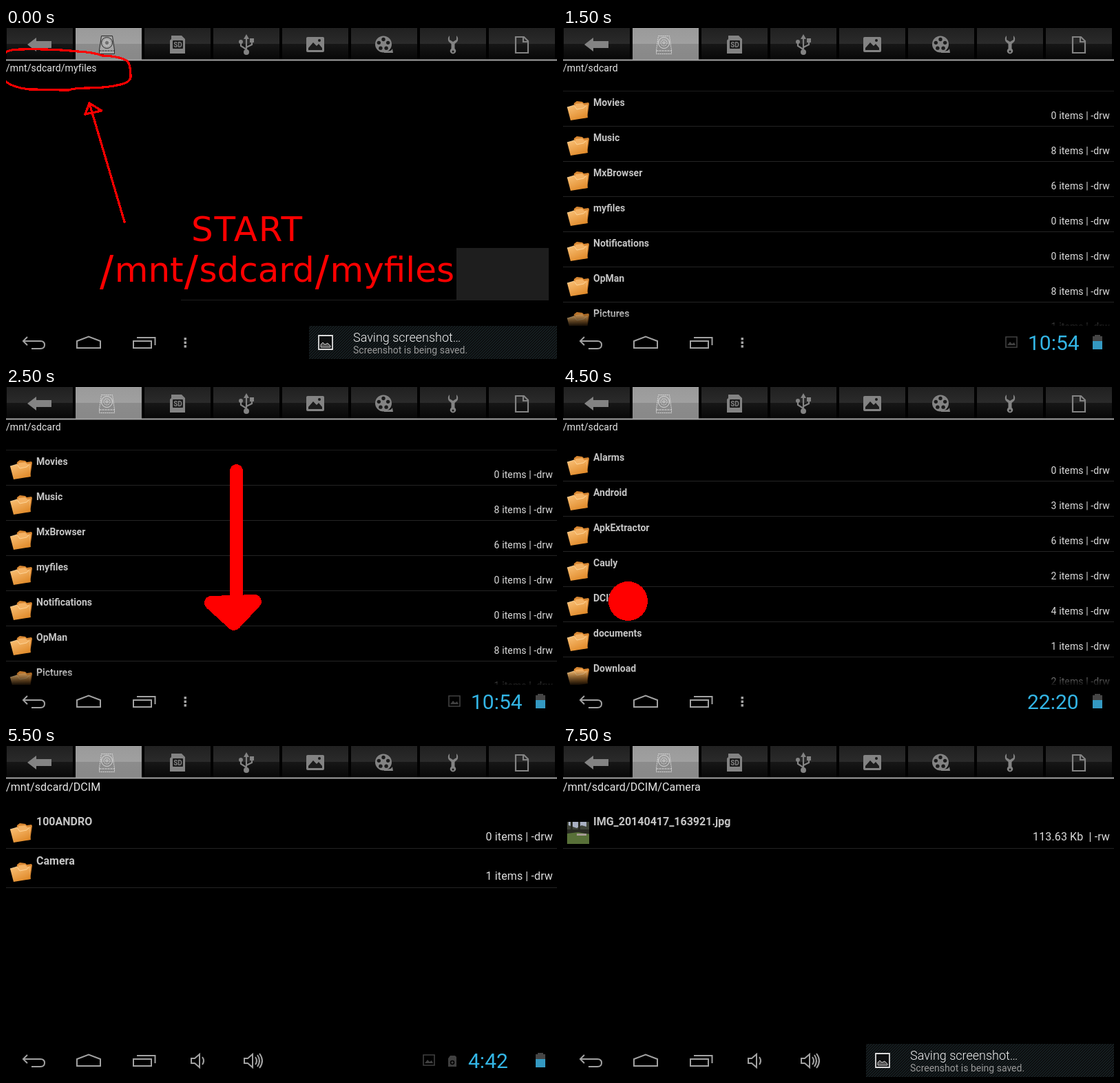
These frames come from a looping animation (800 px wide and 480 px high, 8000 ms). An HTML page:

```html
<!DOCTYPE html>
<html lang="en">
<head>
<meta charset="utf-8">
<title>File browser walkthrough</title>
<style>
  html, body { margin: 0; width: 100%; height: 100%; overflow: hidden; background: #000; }
  svg { display: block; width: 800px; height: 480px; font-family: Roboto, sans-serif; }
  .name { font-weight: 700; fill: #c4c4c4; }
  .info { text-anchor: end; fill: #dcdcdc; letter-spacing: .12px; }
  .path { fill: #e6e6e6; letter-spacing: .09px; }
  .red { fill: none; stroke: #f00; stroke-width: 3.2; stroke-linecap: round; stroke-linejoin: round; shape-rendering: crispEdges; }
  .big { font: 50px "DejaVu Sans", sans-serif; fill: #f00; }
  .nav { fill: none; stroke: #a2a2a2; stroke-width: 2; }
  .clock { font-size: 30px; fill: #33b5e5; }
</style>
</head>
<body>
<svg viewBox="0 0 800 480" xmlns="http://www.w3.org/2000/svg">
  <defs>
    <linearGradient id="tab" x2="0" y2="1">
      <stop offset="0" stop-color="#202020"/><stop offset=".5" stop-color="#2b2b2b"/>
      <stop offset=".5" stop-color="#171717"/><stop offset="1" stop-color="#070707"/>
    </linearGradient>
    <linearGradient id="tabOn" x2="0" y2="1">
      <stop offset="0" stop-color="#9a9a9a"/><stop offset=".5" stop-color="#a0a0a0"/>
      <stop offset=".5" stop-color="#8c8c8c"/><stop offset="1" stop-color="#888"/>
    </linearGradient>
    <linearGradient id="flap" x2=".6" y2="1">
      <stop offset="0" stop-color="#fbc37a"/><stop offset="1" stop-color="#e08a2a"/>
    </linearGradient>
    <linearGradient id="fade" x2="0" y2="1">
      <stop offset="0" stop-opacity="0"/><stop offset="1"/>
    </linearGradient>
    <pattern id="hatch" width="4" height="4" patternUnits="userSpaceOnUse">
      <rect width="4" height="4" fill="#0d0f10"/>
      <path d="M-1 1L1-1M0 4L4 0M3 5L5 3" stroke="#1d2c31" stroke-width=".9"/>
    </pattern>
    <g id="folder">
      <path d="M16-33L20-36L28-35L30-33L37-34L38-32L35-12L13-10Z" fill="#d88630"/>
      <path d="M18-32L28-33L31-30L36-31L34-14L14-12Z" fill="#f4b264"/>
      <path d="M6-27L16-30L20-24L30-26L33-29L36-12L11-8Z" fill="url(#flap)"/>
      <path d="M6-27L16-30L20-24L30-26L33-29" fill="none" stroke="#ffdca4" stroke-width=".8"/>
    </g>
    <g id="photo">
      <path d="M6-38H38V-6H6Z" fill="#3f4438"/>
      <path d="M8-38H34V-31L27-33L20-29L8-33Z" fill="#a9b0c2"/>
      <path d="M11-38H14V-22H11ZM22-38H25V-24H22ZM6-27H38V-21H6Z" fill="#282a22"/>
      <path d="M6-21L22-23L38-20V-6H6Z" fill="#587038"/>
      <path d="M20-21H34V-18H20Z" fill="#a79c96"/>
    </g>
    <g id="pic">
      <path d="M1 1H17V16H1Z" fill="none" stroke="#404040" stroke-width="1.6"/>
      <path d="M3 13L7 8L10 11L13 9L15 13Z" fill="#404040"/>
    </g>
  </defs>
  <rect width="800" height="480"/>
  <g id="tabs"></g>
  <path d="M0 46.5H800" stroke="#a4a4a4" stroke-width="2"/>
  <g fill="#838383">
    <path d="M31 24L44 14V19H66V29H44V34Z"/>
    <path d="M240 11H255L260 16V37H238V18L240 16Z"/>
    <rect x="242" y="18" width="15" height="12" rx="1" fill="#1b1b1b"/>
    <text x="249.5" y="28" font-size="10" font-weight="700" text-anchor="middle">SD</text>
    <path d="M349 9L353 16H345Z"/><circle cx="349" cy="35" r="4"/>
    <path d="M349 14V35M349 31L341 26V21M349 28L357 24V19" fill="none" stroke="#838383" stroke-width="2.2"/>
    <circle cx="341" cy="20" r="3"/><path d="M354 15H360V21H354Z"/>
    <rect x="436" y="13" width="26" height="22" rx="2"/>
    <path d="M439 32V29L446 21L451 26L454 23L459 29V32Z" fill="#1b1b1b"/><circle cx="455" cy="18" r="2" fill="#1b1b1b"/>
    <circle cx="548" cy="23.5" r="12"/><path d="M549 33Q559 35 561 30L562 36H549Z"/>
    <g id="holes" fill="#1b1b1b"></g>
    <path d="M644 11V17L649 20L654 17V11Q658 15 655 20L651.5 23V30Q654 32 653 35Q649 40 645 35Q644 32 646.5 30V23L643 20Q640 15 644 11Z"/>
    <circle cx="649" cy="34" r="1.5" fill="#1b1b1b"/>
    <path d="M740 13H752L758 19V36H740ZM751 13V20H758" fill="none" stroke="#838383" stroke-width="2.2"/>
  </g>
  <g id="view"></g>
</svg>
<script>
const $ = id => document.getElementById(id);
const text = (x, y, size, s, cls, attrs = '') => `<text x="${x}" y="${y}" font-size="${size}" class="${cls}" ${attrs}>${s}</text>`;
const shape = (d, attrs) => `<path d="${d}" ${attrs}/>`;
const use = (id, x, y) => `<use href="#${id}" x="${x}" y="${y}"/>`;
const dot = (x, y) => `<circle cx="${x}" cy="${y}" r="28.5" fill="#f00" shape-rendering="crispEdges"/>`;

for (let i = 0; i < 8; i++) {
  $('tabs').innerHTML += `<rect x="${i * 100 + 1}" width="96" height="46" fill="url(#${i === 1 ? 'tabOn' : 'tab'})"/>`;
}
for (let i = 0; i < 5; i++) {
  const a = (i * 72 - 90) * Math.PI / 180;
  $('holes').innerHTML += `<circle cx="${548 + 7 * Math.cos(a)}" cy="${23.5 + 7 * Math.sin(a)}" r="2.7"/>`;
}

function disk(dark) {
  const line = dark ? '#2a2a2a' : '#dadada';
  return `<g fill="none" stroke="${line}">` +
    shape('M138.5 11.5H154.5L157.5 32V37.5H135.5V32Z', dark ? 'fill="#a6a6a6"' : 'stroke-dasharray="2 1"') +
    shape('M135.5 33H157.5', 'stroke-dasharray="3 1"') +
    '<circle cx="146.5" cy="21.5" r="8"/><circle cx="146.5" cy="21.5" r="4.5" stroke="#ddd" stroke-dasharray="2 1"/>' +
    '<circle cx="146.5" cy="21.5" r="1.5"/></g>';
}

// Each row hangs from the rule below it.
function row(y, size, [name, info], icon = 'folder') {
  const small = size === 14;
  return use(icon, 0, y) + text(44, y - (small ? 29 : 33), size, name, 'name') +
    text(794, y - (small ? 10 : 11), size, info, 'info') +
    shape(`M0 ${y + .5}H800`, 'stroke="#242424"');
}

function list(y, items) {
  return items.map(([name, n], i) => row(y + i * 51, 14, [name, n + ' items | -drw'])).join('') +
    '<rect y="411" width="800" height="23" fill="url(#fade)"/>';
}

function nav(volume) {
  const extra = volume
    ? [269, 346].map((x, i) => shape(`M${x} 453H${x + 5}L${x + 12} 447V466L${x + 5} 460H${x}Z` +
        `M${x + 16} 451Q${x + 20} 456.5 ${x + 16} 462` +
        (i ? `M${x + 19} 448Q${x + 25} 456.5 ${x + 19} 465M${x + 22} 446Q${x + 30} 456.5 ${x + 22} 467` : ''),
        'class="nav"')).join('')
    : shape('M258.5 449H262V452.5H258.5ZM258.5 454.5H262V458H258.5ZM258.5 460H262V463.5H258.5Z', 'fill="#a2a2a2"');
  return '<rect y="432" width="800" height="48"/>' +
    shape('M31 448L25 454L31 460M25 454H50Q56 454 56 459.5T50 465H37', 'class="nav"') +
    shape('M103 464V454L120 447.5L137 454V464Z', 'class="nav"') +
    shape('M185 454H211V464H185ZM190 449H216.5V460', 'class="nav"') + extra;
}

function toast() {
  return '<rect x="440" y="432" width="360" height="48" fill="url(#hatch)"/>' +
    shape('M454 446H474V466H454Z', 'fill="#0d0f10" stroke="#dcdcdc" stroke-width="1.8"') +
    shape('M457 463V459L460 456L463 459L467 457L471 461V463Z', 'fill="#555" stroke="#c8c8c8"') +
    text(504, 455, 18, 'Saving screenshot…', '', 'font-weight="300" fill="#f2f2f2"') +
    text(504, 472, 14, 'Screenshot is being saved.', '', 'fill="#999"');
}

function status(x, time, pic, card) {
  return text(x, 467, 30, time, 'clock') + (pic ? use('pic', pic, 447) : '') +
    (card ? shape('M645 449H652L654 451V465H642V453Z', 'fill="#404040"') +
      '<circle cx="648" cy="459" r="2.5" fill="none" stroke="#000" stroke-width="1.5"/>' : '') +
    shape('M772 445H780V447H783V454H769V447H772Z', 'fill="#454545"') +
    shape('M769 454H783V466H769Z', 'fill="#3499c2"');
}

const path = (s, size = 14) => text(0, size === 14 ? 63 : 65, size, s, 'path');
// Slashes are set larger and lower than the words between them.
const step = s => `<tspan dx="1" dy="5" font-size="60">/</tspan><tspan dx="1.5" dy="-5">${s}</tspan>`;

const intro = '<rect x="654" y="319" width="134" height="76" fill="#1e1e1e"/>' +
  shape('M254 394.5H654', 'stroke="#1e1e1e"') +
  shape('M-2 37Q2 31 22 31Q68 30 104 34Q126 35 140 40Q166 41 176 48Q181 53 181 71Q180 79 166 82Q146 87 118 87Q100 87 91 90L80 90Q52 89 34 89Q8 86 -2 76', 'class="red"') +
  shape('M172 281L121 109L115 125L139 120L121 109', 'class="red"') +
  '<text class="big" x="269" y="309" letter-spacing="1.7">START</text>' +
  `<text class="big" x="135" y="368">${['mnt', 'sdcard', 'myfiles'].map(step).join('')}</text>`;

const swipe = shape('M334.5 121.5V313', 'class="red" style="stroke-width:19"') +
  shape('M298 313L361 311L331 343Z', 'class="red" style="fill:#f00;stroke-width:20"');

const empty = disk(true) + path('/mnt/sdcard/myfiles') + nav() + toast();
const root = disk() + path('/mnt/sdcard');
const lower = root + shape('M0 91.5H800', 'stroke="#1c1c1c"') + list(142, [
  ['Movies', 0], ['Music', 8], ['MxBrowser', 6], ['myfiles', 0], ['Notifications', 0], ['OpMan', 8], ['Pictures', 1]
]) + nav() + status(675, '10:54', 642);
const upper = root + list(136, [
  ['Alarms', 0], ['Android', 3], ['ApkExtractor', 6], ['Cauly', 2], ['DCIM', 4], ['documents', 1], ['Download', 2]
]) + nav();
const dcim = disk() + path('/mnt/sdcard/DCIM', 16) +
  row(148, 16, ['100ANDRO', '0 items | -drw']) + row(205, 16, ['Camera', '1 items | -drw']) +
  nav(true) + status(671, '4:42', 605, true);
const camera = disk() + path('/mnt/sdcard/DCIM/Camera', 16) +
  row(148, 16, ['IMG_20140417_163921.jpg', '113.63 Kb\u00a0 | -rw'], 'photo') + nav(true) + toast();

const scenes = [
  empty + intro,
  empty + dot(40.5, 456.5),
  lower,
  lower + swipe,
  upper + status(675, '10:54', 642),
  upper + status(674, '22:20') + dot(94.5, 310.5),
  dcim,
  dcim + dot(111.5, 171.5),
  camera
];

// The first and last scenes last half a second, the others a full second.
let shown = -1;
function render(t) {
  const i = Math.floor((t % 8000 + 500) / 1000);
  if (i !== shown) $('view').innerHTML = scenes[shown = i];
}
function tick() {
  render(performance.now());
  requestAnimationFrame(tick);
}
tick();
</script>
</body>
</html>
```
